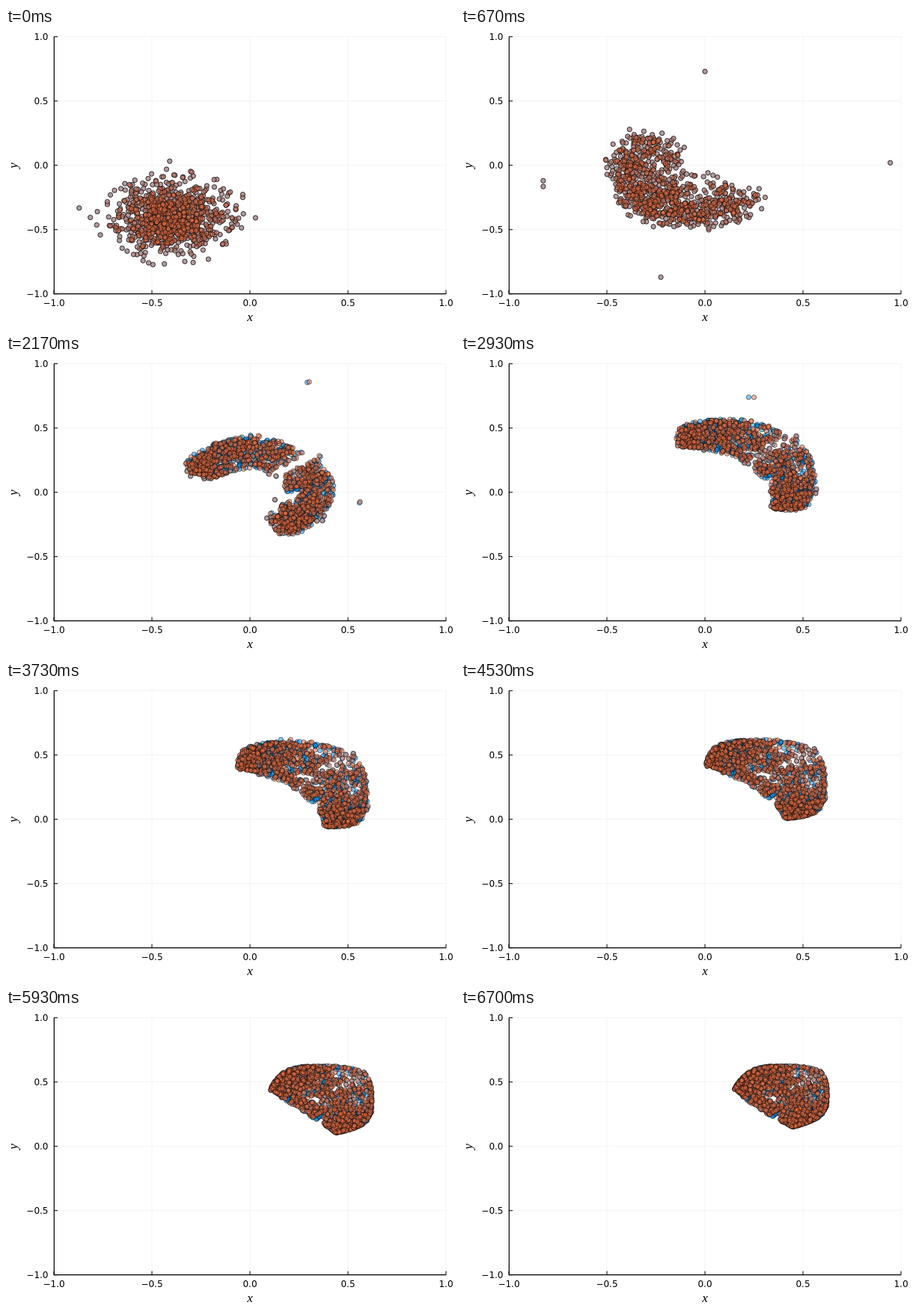
These frames come from a looping animation (600 by 400 pixels, 6.73 s). An HTML page with a canvas:

```html
<!DOCTYPE html>
<html lang="en">
<head>
<meta charset="utf-8">
<title>Particle flow</title>
<style>
  html, body { margin: 0; width: 100%; height: 100%; overflow: hidden; background: #fff; }
  svg, canvas { position: absolute; left: 0; top: 0; width: 600px; height: 400px; }
  .tick { font: 12px "DejaVu Sans", sans-serif; }
  .name { font: italic 17px "Liberation Serif", serif; text-anchor: middle; }
</style>
</head>
<body>
<svg id="axes" viewBox="0 0 600 400">
  <text class="name" x="326" y="392">x</text>
  <text class="name" transform="translate(15 184) rotate(-90)">y</text>
</svg>
<canvas id="cloud" width="600" height="400"></canvas>
<script>
const LOOP = 6730, STEP = 100 / 3, COUNT = 1000;
const px = x => 326 + 262 * x;
const py = y => 183.7 - 172 * y;

const mix = (a, b, k) => a + (b - a) * k;
const clamp = v => Math.max(0, Math.min(1, v));
function smooth(from, to, t) {
  const k = clamp((t - from) / (to - from));
  return k * k * (3 - 2 * k);
}

// Axes, grid and labels
const axes = document.getElementById('axes');
function add(tag, attrs, text = '') {
  const el = document.createElementNS('http://www.w3.org/2000/svg', tag);
  for (const key in attrs) el.setAttribute(key, attrs[key]);
  el.textContent = text;
  axes.append(el);
}
function line(d, stroke, width = 1) {
  add('path', { d, stroke, 'stroke-width': width, fill: 'none' });
}
for (let v = -1; v <= 1; v += 0.5) {
  const label = v.toFixed(1).replace('-', '\u2212');
  const x = px(v), y = py(v);
  line(`M${x} 11.7V355.7M64 ${y}H588`, 'rgba(0,0,0,.1)', 0.5);
  line(`M${x} 355.7v-5M64 ${y}h5`, '#000');
  add('text', { class: 'tick', x, y: 372, 'text-anchor': 'middle' }, label);
  add('text', { class: 'tick', x: 56.5, y: y + 4.4, 'text-anchor': 'end' }, label);
}
line('M64.3 11.7V355.7H588', '#000', 1.2);

// Seeded randomness
let seed = 20417;
function random() {
  seed = seed + 0x6D2B79F5 | 0;
  let r = Math.imul(seed ^ seed >>> 15, 1 | seed);
  r = r + Math.imul(r ^ r >>> 7, 61 | r) ^ r;
  return ((r ^ r >>> 14) >>> 0) / 4294967296;
}
function normal() {
  let g;
  do g = Math.sqrt(-2 * Math.log(1 - random())) * Math.cos(2 * Math.PI * random());
  while (Math.abs(g) > 2.8);
  return g;
}
const cdf = g => 1 / (1 + Math.exp(-1.6 * g - 0.07 * g ** 3));

// Places to which single particles are flung early on
const KICKS = [[0, .73], [.945, .02], [-.825, -.12], [-.825, -.165], [-.225, -.87], [.5, 1.1]];

// g runs across the diagonal, h along it
const particles = Array.from({ length: COUNT }, (_, n) => {
  const g = normal(), h = normal();
  return {
    x: -.4 + .1 * (g + h),
    y: -.4 + .095 * (h - g),
    side: Math.sign(g),
    swing: Math.abs(2 * cdf(g) - 1) ** 1.2,
    depth: cdf(-h),
    jx: normal(),
    jy: normal(),
    kick: KICKS[n]
  };
});

// The flow at time t (seconds): particles pass round the origin on both sides
// and end in a wedge that is capped by a rounded square
function flow(t) {
  const late = smooth(1.5, 2.9, t);
  return {
    t, late,
    lag: Math.PI / 180 * Math.min(180, 125 * Math.exp(-.233 * t) * (1 + .87 * (1 - smooth(1.4, 2.9, t)))),
    reach: 1 - 1.15 * Math.exp(-1.4 * t),
    inner: .25 + .0225 * t,
    cap: .625 - 1.4 * Math.exp(-t),
    power: Math.max(2, 2 * t - 3),
    bend: mix(.4, 1, late),
    noise: .05 * Math.exp(-.5 * t),
    clump: .8 * clamp((t - .8) / 3),
    arrival: clamp(t) * (2 - clamp(t))
  };
}

function place(p, f, blue) {
  let q = 1 - f.reach * p.swing;
  if (blue && q > 0) {
    const s = q * q;
    q = Math.sqrt(s + f.clump * Math.sin(2 * Math.PI * s) / (2 * Math.PI));
  }
  const turn = f.lag * q, angle = Math.PI / 4 + p.side * turn;
  const cos = Math.cos(angle), sin = Math.sin(angle);

  const near = f.inner * (1 + .17 * q * q);
  const square = f.cap * (Math.abs(cos) ** f.power + Math.abs(sin) ** f.power) ** (-1 / f.power);
  const far = near + (square - near) * Math.sqrt(Math.max(0, 1 - q ** 8));
  const ring = .33 + .04 * Math.cos(turn) + .2 * Math.max(0, 1.47 - f.t);
  const w = Math.min(1, p.depth ** f.bend * (1 + .08 * f.late));
  const r = mix(mix(.08, near, f.late), mix(ring, far, f.late), w);

  let x = mix(p.x, r * cos + f.noise * p.jx, f.arrival);
  let y = mix(p.y, r * sin + f.noise * p.jy, f.arrival);
  if (p.kick) {
    const [kx, ky] = p.kick;
    const back = 1.4 + 2 * Math.max(0, kx + ky);
    const k = smooth(0, .4, f.t) * (1 - smooth(.67, back, f.t));
    x = mix(x, kx, k);
    y = mix(y, ky, k);
  }
  return [px(x), py(y)];
}

const ctx = document.getElementById('cloud').getContext('2d');
ctx.beginPath();
ctx.rect(64, 11, 525, 345);
ctx.clip();
ctx.lineWidth = 1;
ctx.strokeStyle = 'rgba(0,0,0,.5)';

function drawSet(f, colour, blue) {
  ctx.fillStyle = colour;
  for (const p of particles) {
    ctx.beginPath();
    ctx.arc(...place(p, f, blue), 3.1, 0, 2 * Math.PI);
    ctx.fill();
    ctx.stroke();
  }
}

let shown = -1;
function draw(now) {
  const step = Math.floor((now % LOOP + 3.4) / STEP);
  if (step === shown) return;
  shown = step;
  const f = flow(step * STEP / 1000);
  ctx.clearRect(0, 0, 600, 400);
  drawSet(f, 'rgba(0,154,250,.5)', true);
  drawSet(f, 'rgba(227,111,71,.5)', false);
}

const start = performance.now();
function loop() {
  draw(performance.now() - start);
  requestAnimationFrame(loop);
}
loop();
</script>
</body>
</html>
```
